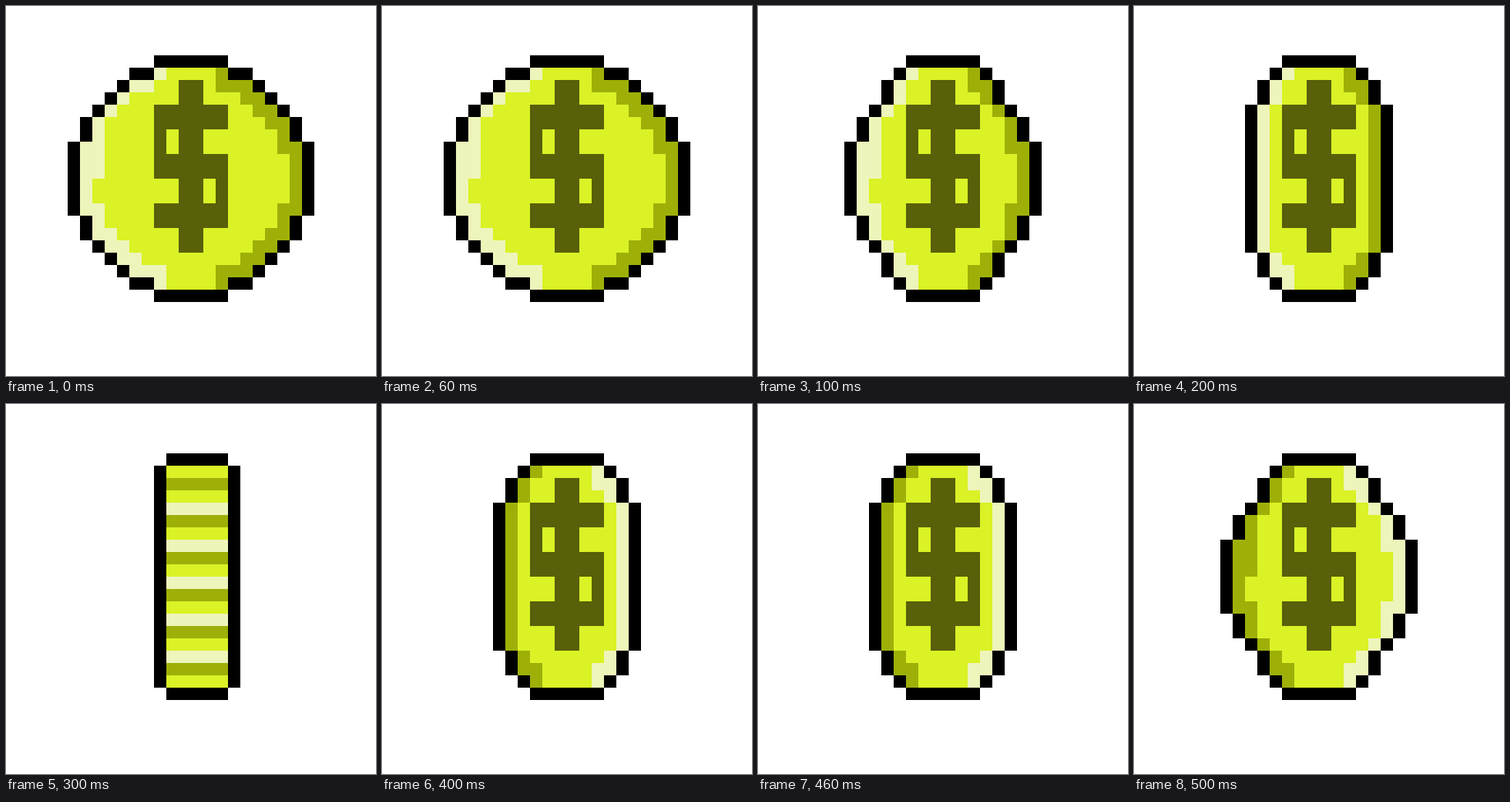
Animation, 480 px wide and 480 px high, one loop 0.6 s. Source, as an HTML page:

```html
<!DOCTYPE html>
<html lang="en">
<head>
<meta charset="utf-8">
<title>Spinning coin</title>
<style>
  html, body { margin: 0; width: 100%; height: 100%; overflow: hidden; background: #fff; }
  svg { display: block; width: 100vw; height: 100vh; }
</style>
</head>
<body>
<svg id="stage" viewBox="0 0 30 30" shape-rendering="crispEdges"></svg>
<script>
const STEP = 100;
const BLACK = '#000', GOLD = '#daf226', LIGHT = '#eef5ba', DARK = '#9eb008', SIGN = '#586009';
const MID_X = 15, MID_Y = 14;

// rim: [half width, half height] of the stacked bars that form the stepped outline
const wide = {
  rim: [[3, 10], [5, 9], [6, 8], [7, 7], [8, 6], [9, 5], [10, 3]],
  body: 'M13 5H17V7H19V8H20V9H21V10H22V12H23V16H22V18H21V19H20V20H19V21H17V23' +
        'H13V21H11V20H10V19H9V18H8V16H7V14H8V9H9V8H10V7H12V6H13Z'
};
const medium = {
  rim: [[3, 10], [4, 9], [5, 8], [6, 6], [7, 5], [8, 3]],
  body: 'M13 5H17V7H18V8H19V9H20V12H21V16H20V19H19V20H18V21H17V23' +
        'H13V21H12V20H11V19H10V16H9V14H10V9H11V8H12V6H13Z'
};
const slim = {
  rim: [[3, 10], [4, 9], [5, 8], [6, 6]],
  body: 'M13 5H17V7H18V8H19V20H18V21H17V23H13V21H12V20H11V8H12V6H13Z'
};
const dollar = 'M14 6h2v2h2v2h-2v2h2v6h-2v2h-2v-2h-2v-2h2v-2h-2V8h2z' +
               'M13 10v2h1v-2zM16 14v2h1v-2z';

const rect = (x, y, w, h, fill) =>
  `<rect x="${x}" y="${y}" width="${w}" height="${h}" fill="${fill}"/>`;
const path = (d, fill) => `<path d="${d}" fill="${fill}" fill-rule="evenodd"/>`;

function face({ rim, body }, left, right) {
  const outline = rim.map(([w, h]) => rect(MID_X - w, MID_Y - h, 2 * w, 2 * h, BLACK));
  // each inner bar is as wide as one rim bar and as tall as the next
  const shade = rim.slice(1).map(([, h], i) => {
    const w = rim[i][0];
    return rect(MID_X - w, MID_Y - h, w, 2 * h, left) +
           rect(MID_X, MID_Y - h, w, 2 * h, right);
  });
  return outline.join('') + shade.join('') + path(body, GOLD) + path(dollar, SIGN);
}

function edge() {
  let out = rect(13, 4, 5, 20, BLACK) + rect(12, 5, 7, 18, BLACK) + rect(13, 5, 5, 18, GOLD);
  for (let y = 6; y < 22; y++) {
    const fill = [DARK, GOLD, LIGHT][(y - 1) % 3];
    out += rect(13, y, 5, 1, fill === GOLD ? LIGHT : fill === LIGHT ? DARK : GOLD);
  }
  return out;
}

const poses = [
  face(wide, LIGHT, DARK),
  face(medium, LIGHT, DARK),
  face(slim, LIGHT, DARK),
  edge(),
  face(slim, DARK, LIGHT),
  face(medium, DARK, LIGHT)
];

const stage = document.getElementById('stage');
stage.innerHTML = poses.map(p => `<g>${p}</g>`).join('');

const count = poses.length;
[...stage.children].forEach((g, i) => {
  const keys = [
    { opacity: 0, offset: 0 },
    { opacity: 1, offset: i / count },
    { opacity: 0, offset: (i + 1) / count },
    { opacity: 0, offset: 1 }
  ].map(k => ({ ...k, easing: 'step-end' }));
  g.animate(keys, { duration: STEP * count, iterations: Infinity });
});
</script>
</body>
</html>
```
